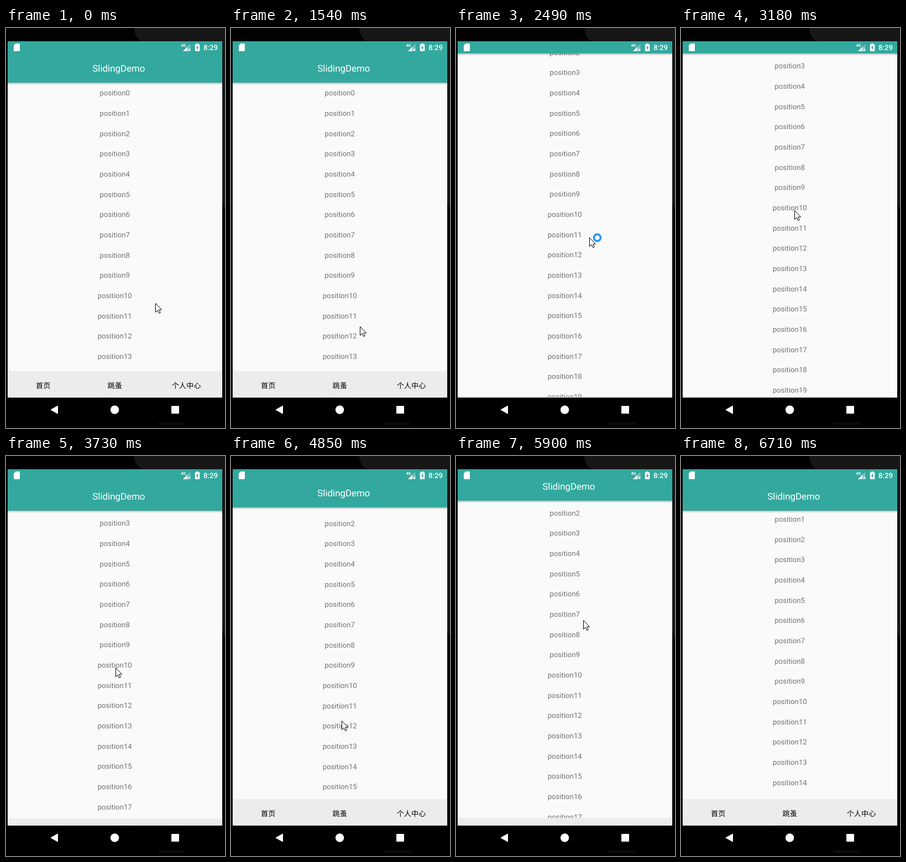
Write an HTML page that moves like this. It is 396 by 724 pixels and loops after 7.11 s.

```html
<!DOCTYPE html>
<html lang="zh">
<head>
<meta charset="utf-8">
<title>SlidingDemo</title>
<style>
  html, body { margin: 0; width: 100%; height: 100%; overflow: hidden; background: #000; }
  svg { display: block; width: 396px; height: 724px; }
  text {
    font-family: Roboto, "Noto Sans CJK SC", "Noto Sans CJK", sans-serif;
    font-size: 13.2px;
    text-rendering: geometricPrecision;
  }
  .mid { text-anchor: middle; }
</style>
</head>
<body>
<svg viewBox="0 0 396 724">
  <defs>
    <clipPath id="screen"><path d="M3 24H391V668.800H3Z"/></clipPath>
    <linearGradient id="shade" x2="0" y2="1">
      <stop stop-color="#000" stop-opacity=".25"/>
      <stop offset="1" stop-color="#000" stop-opacity="0"/>
    </linearGradient>
  </defs>

  <!-- device frame -->
  <rect width="396" height="724"/>
  <path d="M232 0H396V325Q391 322 391 312V24H246Q233 18 232 0Z" fill="#171717"/>
  <path d="M276 716h48" stroke="#0b0b0b" stroke-width="4"/>

  <g clip-path="url(#screen)">
    <rect x="3" y="24" width="388" height="645" fill="#fafafa"/>
    <g id="list" class="mid" fill="#747474"></g>

    <g id="bar">
      <rect x="3" y="621" width="388" height="48" fill="#ececec"/>
      <g class="mid">
        <text x="67.3" y="652">首页</text>
        <text x="196.8" y="652">跳蚤</text>
        <text x="326" y="652">个人中心</text>
      </g>
    </g>

    <g id="header">
      <rect x="3" y="24" width="388" height="75" fill="#33a89e"/>
      <rect x="3" y="99" width="388" height="4" fill="url(#shade)"/>
      <text x="156.3" y="79.3" fill="#fff" style="font-size:16.9px">SlidingDemo</text>
    </g>

    <!-- status bar -->
    <rect x="3" y="24" width="388" height="22" fill="#33a89e"/>
    <g fill="#fff">
      <path d="M17.500 28h6.500q1 0 1 1v12q0 1-1 1h-9q-1 0-1-1v-9.500Z"/>
      <text x="316.5" y="34.3" style="font-size:7px;font-weight:700">4G</text>
      <path d="M320 42L333.500 28.500V42Z" opacity=".3"/>
      <path d="M320 42L328 34V42Z"/>
      <path d="M329.700 37.700l3.600 3.600m0-3.600l-3.600 3.600" stroke="#fff" stroke-width="1.200"/>
      <path d="M344 28h4v1.500h1.500q.8 0 .8.800v11q0 .8-.8.800h-7q-.8 0-.8-.8v-11q0-.8.800-.8h1.500Z"/>
      <path d="M346.800 31l-3 5.500h1.800v3.500l2.900-5.300h-1.700Z" fill="#33a89e"/>
      <text x="383" y="40" text-anchor="end" style="font-weight:500">8:29</text>
    </g>
  </g>

  <!-- navigation bar -->
  <g fill="#fff">
    <path d="M81 691L93.500 684V698Z" stroke="#fff" stroke-linejoin="round"/>
    <circle cx="196.600" cy="691" r="7.700"/>
    <rect x="299" y="684" width="14" height="14" rx="1"/>
  </g>

  <g id="cursor">
    <path d="M.5.500V16.500L4.200 13L6.700 18.500L9.200 17.400L6.800 12H11.500Z" fill="#fff" stroke="#000"/>
    <circle id="busy" cx="14.500" cy=".5" r="6" fill="#fff" stroke="#2b98f0" stroke-width="3.800"/>
  </g>
</svg>

<script>
const LOOP = 7110, ROW = 36.66, HEADER = 53, BAR = 47, BAR_TIME = 465;
const el = id => document.getElementById(id);
const clamp = (v, low, high) => Math.min(high, Math.max(low, v));

// The picture refreshes in bursts of evenly spaced steps and holds between them.
const bursts = [
  [0, 1, 2], [120, 710, 5], [1540, 2490, 7], [2640, 3300, 5],
  [3580, 4550, 8], [4700, 5630, 8], [5780, 6710, 8]
];

// Swipes: start, end, distance (positive scrolls the content up).
const swipes = [
  [1750, 2771, 159], [3565, 4029, -96], [4815, 5164, 60], [5622, 6283, -83]
];

// Pointer turning points: time, x, y.
const pointer = [
  [0, 270, 498], [710, 233, 540], [1650, 233, 540], [2490, 241, 379],
  [3300, 196, 317], [3719, 198, 383], [4700, 200, 498], [4833, 200, 479],
  [5500, 224, 213], [5630, 225, 227], [6710, 260, 730]
];

function snap(time) {
  const [first, last, steps] = bursts.findLast(burst => burst[0] <= time);
  const gap = (last - first) / (steps - 1);
  return first + gap * Math.min(steps - 1, Math.floor((time - first) / gap + 0.001));
}

function pointerAt(t) {
  const next = pointer.findIndex(key => key[0] > t);
  if (next < 0) return pointer.at(-1).slice(1);
  const [t0, x0, y0] = pointer[next - 1], [t1, x1, y1] = pointer[next];
  const k = (t - t0) / (t1 - t0);
  return [x0 + (x1 - x0) * k, y0 + (y1 - y0) * k];
}

// The header takes each swipe first; the list scrolls by what is left.
function layoutAt(t) {
  let header = 0, scroll = 0, bar = 0;
  for (const [start, end, distance] of swipes) {
    if (t < start) break;
    const left = 1 - clamp((t - start) / (end - start), 0, 1);
    const moved = distance * (1 - left * left);
    const folded = clamp(header + moved, 0, HEADER);
    scroll += moved - (folded - header);
    header = folded;

    const p = clamp((t - start) / BAR_TIME, 0, 1);
    const eased = p * p * (3 - 2 * p);
    bar = BAR * (distance > 0 ? eased : 1 - eased);
  }
  return { header, scroll, bar };
}

function move(id, x, y) {
  el(id).setAttribute("transform", `translate(${x} ${y})`);
}

for (let i = 0; i < 23; i++) {
  const row = document.createElementNS("http://www.w3.org/2000/svg", "text");
  row.setAttribute("x", 196.7);
  row.setAttribute("y", 122.3 + i * ROW);
  row.textContent = "position" + i;
  el("list").append(row);
}

function draw(time) {
  const t = snap(time % LOOP);
  const { header, scroll, bar } = layoutAt(t);
  move("header", 0, -Math.round(header));
  move("list", 0, -Math.round(header + scroll));
  move("bar", 0, Math.round(bar));
  move("cursor", ...pointerAt(t).map(Math.round));
  el("busy").style.display = t > 2300 && t < 2640 ? "" : "none";
}

const start = performance.now();
function loop() {
  draw(performance.now() - start);
  requestAnimationFrame(loop);
}
loop();
</script>
</body>
</html>
```
